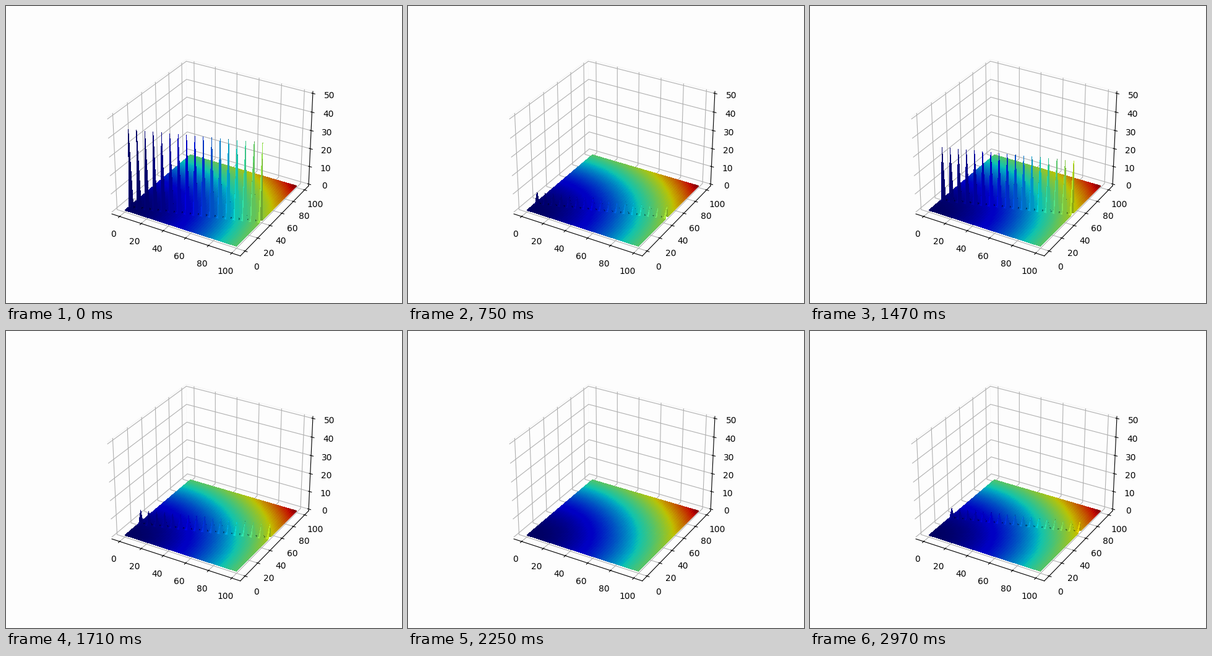
Recreate the animation shown at these times as a matplotlib script. Size 640x480 px, loop 3000 ms.

```python
import matplotlib.pyplot as plt
import numpy as np
from matplotlib import cm
from matplotlib.animation import FuncAnimation

FRAMES = 100
BACK = "#fdfdfd"

fig = plt.figure(figsize=(6.4, 4.8), dpi=100, facecolor=BACK)
ax = fig.add_subplot(projection="3d", facecolor=BACK)

axis = np.linspace(0, 100, 50)
X, Y = np.meshgrid(axis, axis)
colors = cm.jet((X**2 + Y**2) / 20000)


def padded(low, high):
    pad = (high - low) / 48
    return low - pad, high + pad


def soliton(n):
    """Narrow sech² ridge along x = 3y, drifting towards larger y."""
    phase = 5 * (X - 3 * Y + 16.409 + 0.74487 * n)
    return 50 / np.cosh(np.clip(phase, -50, 50)) ** 2


def style_axes():
    ax.set_xlim(*padded(-5, 105), view_margin=0)
    ax.set_ylim(*padded(-5, 105), view_margin=0)
    ax.set_zlim(*padded(0, 50), view_margin=0)
    ax.set_xticks(range(0, 101, 20))
    ax.set_yticks(range(0, 101, 20))
    ax.set_zticks(range(0, 51, 10))
    for a in (ax.xaxis, ax.yaxis, ax.zaxis):
        a.set_pane_color(BACK)
        a.pane.set_edgecolor("#f6f6f6")


def update(n):
    for surface in list(ax.collections):
        surface.remove()
    surface = ax.plot_surface(X, Y, soliton(n), facecolors=colors,
                              linewidth=0, antialiased=False)
    style_axes()
    return [surface]


anim = FuncAnimation(fig, update, frames=FRAMES, interval=30,
                     init_func=lambda: update(0), repeat=True, repeat_delay=0)
plt.show()
```
